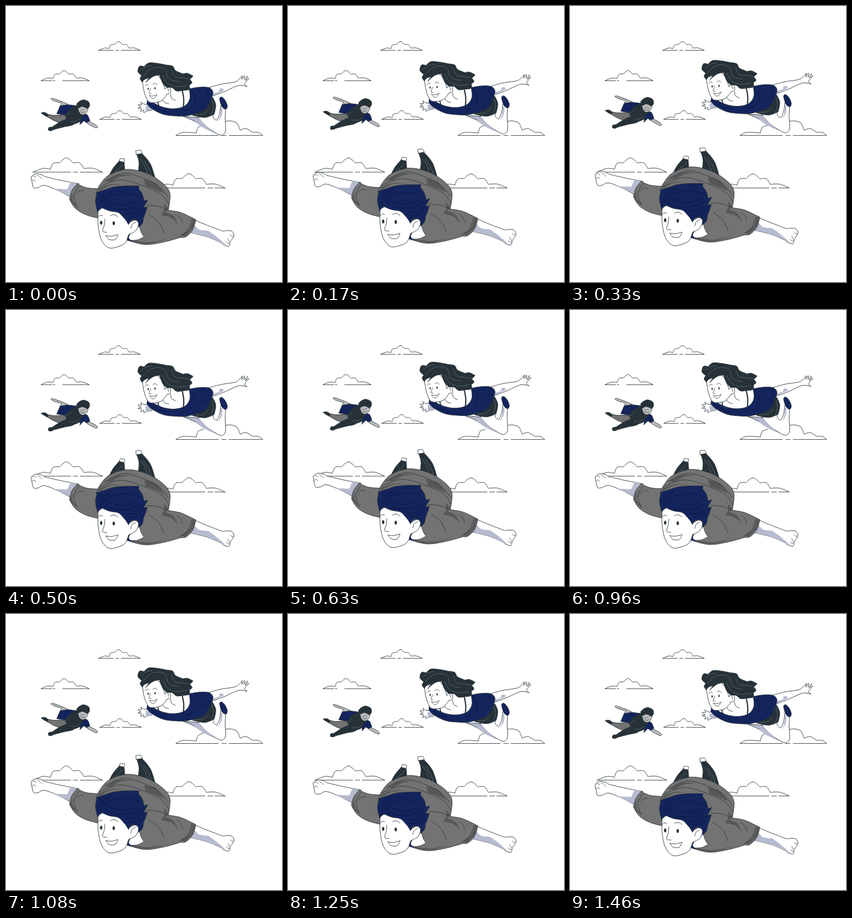
An HTML page with a canvas for the animation above (1.5 s loop, 500x500 px).

```html
<!DOCTYPE html>
<html lang="en">
<head>
<meta charset="utf-8">
<title>Flying people</title>
<style>
html, body { margin: 0; width: 100%; height: 100%; overflow: hidden; background: #fff; }
canvas { display: block; width: 500px; height: 500px; }
</style>
</head>
<body>
<canvas id="stage"></canvas>
<script>
const INK = '#263238', NAVY = '#14245c', DEEP = '#0b173f', GRAY = '#737373',
  FOLD = '#575757', SHADE = '#b7bbcf', SKIN = '#bdbdbd', HAIRLINE = '#77828a', WHITE = '#fff';
const LOOP = 1500, FPS = 24, RISE = 10;

const canvas = document.getElementById('stage');
const ctx = canvas.getContext('2d');
const ratio = window.devicePixelRatio || 1;
canvas.width = canvas.height = 500 * ratio;

// Traces a smooth curve through "x,y" points; "!" marks a sharp corner.
function trace(text, closed) {
  const points = text.split(' ').map(word => {
    const [x, y] = word.split(',').map(parseFloat);
    return { x, y, sharp: word.endsWith('!') };
  });
  const count = points.length;
  const at = i => points[(i + count) % count];
  const handle = (i, sign) => {
    const p = at(i), end = !closed && (i === 0 || i === count - 1);
    const k = p.sharp || end ? 0 : sign / 6;
    return [p.x + k * (at(i + 1).x - at(i - 1).x), p.y + k * (at(i + 1).y - at(i - 1).y)];
  };
  ctx.moveTo(at(0).x, at(0).y);
  for (let i = 1; i < count + (closed ? 1 : 0); i++) {
    ctx.bezierCurveTo(...handle(i - 1, 1), ...handle(i % count, -1), at(i).x, at(i).y);
  }
  if (closed) ctx.closePath();
}

function stroke(color = INK, width = 0.9) {
  ctx.strokeStyle = color;
  ctx.lineWidth = width;
  ctx.stroke();
}

function flat(color, text) {
  ctx.beginPath();
  trace(text, true);
  ctx.fillStyle = color;
  ctx.fill();
}

function shape(color, text, width) {
  flat(color, text);
  stroke(INK, width);
}

function lines(color, width, ...texts) {
  ctx.beginPath();
  texts.forEach(text => trace(text, false));
  stroke(color, width);
}

function eyes(rx, ry, ...centers) {
  ctx.fillStyle = INK;
  for (const [x, y] of centers) {
    ctx.beginPath();
    ctx.ellipse(x, y, rx, ry, 0, 0, 2 * Math.PI);
    ctx.fill();
  }
}

// A base line with two gaps and four puffs above it.
function cloud(x, y, width, height, gaps) {
  const puffs = '0,0 .14,-.26 .25,-.2! .29,-.62 .38,-.65! .48,-1 .58,-.63! .67,-.65 .73,-.25! .86,-.27 1,0';
  ctx.save();
  ctx.translate(x, y);
  ctx.scale(width, height);
  ctx.beginPath();
  trace(puffs, false);
  const [a, b, c, d] = gaps;
  for (const [from, to] of [[0, a], [b, c], [d, 1]]) {
    ctx.moveTo(from, 0);
    ctx.lineTo(to, 0);
  }
  ctx.restore();
  stroke();
}

function clouds() {
  cloud(168, 80.3, 75, 16, [.35, .41, .48, .54]);
  cloud(63.5, 135.3, 87, 18.5, [.22, .25, .29, .45]);
  cloud(170, 205.3, 75, 16, [.35, .41, .48, .54]);
  cloud(49, 301, 126, 26, [.54, .58, .64, .68]);
  cloud(271, 329.7, 126, 26, [.71, .75, .82, .85]);
  lines(INK, 0.9, '308,234.5 320,229 345,230! 348,220 358,216',
    '396,210 405,208 418,212 424,225! 435,222 447,229! 457,229 465,234.5',
    '308,234.5 385,234.5', '391,234.5 399,234.5', '404,234.5 465,234.5');
}

function boy() {
  shape(SKIN, '112,178! 101,173 90,169 84,167! 81,168! 87,172 101,176! 98,181! 107,184!');
  shape(NAVY, '92,195! 98,181! 112,179 129,181! 126,192! 109,197');
  shape(GRAY, '72,195! 86,198 106,198 118,205! 110,214! 90,209 72,199!');
  shape(INK, '64,194 71,193 76,197 74,200');
  shape(INK, '84,219! 98,210 114,204 126,206 122,215 105,219 86,224!');
  shape(INK, '77,225 78,220 86,220 87,223 82,226');
  shape(INK, '107,198! 115,188 127,181! 138,188 145,199! 135,209 123,214! 113,209');
  lines('#607078', 0.7, '109,199 116,193', '116,209 126,209 133,205');
  shape(SKIN, '144,206! 162,215 166,220! 163,221! 153,216 142,209!');
  shape(NAVY, '134,215! 136,205 143,196! 148,198 152,208! 147,211! 141,208! 137,212!');
  shape(SKIN, '131,181 133,193 139,197 146,193 148,182', 0.7);
  shape(INK, '131,185! 128,178 134,172! 141,170 150,174 151,182 147,186! 142,183 137,182!');
  lines(INK, 0.8, '134,188 135,188', '140,187.5 142,187.5', '138,188 136,191', '136,193 140,193 143,191');
}

function girlLimbs() {
  shape(WHITE, '363,149! 388,142 413,138 421,134 428,126! 427,133! 432,126 431,133! 438,127 ' +
    '433,135! 440,131 434,138 432,142! 437,146! 421,144 396,155 369,165!');
  flat(SHADE, '366,149! 374,153 374,159! 386,155! 387,150! 392,149! 395,153! 369,165!');
  shape(SHADE, '321,200! 345,202 363,206 377,220 393,233! 370,226 355,217 338,207');
  shape(WHITE, '348,202! 364,219 386,233 395,232 398,223 397,204 398,185! 389,180! 387,195 382,207! 376,203 375,194!');
  flat(SHADE, '349,203! 362,217 379,230! 360,222 342,210!');
  flat(SHADE, '389,184! 388,198 384,210! 391,198 392,185!');
  shape(NAVY, '387,168 391,165 397,171 401,181 398,187 391,182');
  shape(INK, '338,198! 354,179 374,165! 380,179 377,196! 360,202');
  lines(HAIRLINE, 0.6, '373,170 376,183 372,197', '342,197 357,196 367,188');
  shape(WHITE, '260,178! 251,178 244,174! 246,179! 239,179 245,183! 239,185 246,186! 244,191 250,188! 250,193 256,190 265,189!');
  flat(SHADE, '253,181! 265,179! 265,189! 253,189!');
}

function girlTorso() {
  flat(WHITE, '281,154! 279,169 270,177! 287,186 308,188 323,184! 332,170 331,151!');
  lines(INK, 0.9, '298,159 300,167 307,171', '284,170 288,175 295,177');
  lines(INK, 1.8, '275,174 277,181 280,187');
  lines(INK, 2.2, '319,152 322,169 321,187');
  shape(NAVY, '257,167! 270,177 287,184 306,186 324,181 333,168 332,150! 351,147 368,148 375,156 ' +
    '372,167 366,181 355,191 327,199 304,199 284,196 264,186 255,177!');
  lines(DEEP, 0.9, '332,153 341,161 342,175 334,186 320,190', '368,149 364,157 370,166',
    '260,177 275,187 291,191', '350,177 358,171 366,170');
}

function girlHead() {
  shape(WHITE, '247,135! 250,154 255,168 262,175 279,173 288,165 291,160! 298,157 297,148 292,146 288,151! 283,135! 272,122!');
  shape(INK, '247,138! 243,132 246,126! 239,119 242,109 250,110! 259,103 275,104 291,107! ' +
    '302,109 307,117 321,123! 329,122 339,127! 333,133! 337,139 332,143! 332,151 321,153 ' +
    '309,154 301,148 292,148! 284,140 278,125! 268,127 259,133 253,139! 259,130! 251,133');
  lines(HAIRLINE, 0.6, '249,126 262,114 277,111 289,116 295,132 313,137',
    '284,126 293,140 309,146 328,144', '300,116 306,128 319,130 332,132', '245,117 254,110 265,108');
  eyes(1.2, 2.1, [257.5, 150], [270, 149]);
  lines(INK, 0.8, '252,145 255,142 258,143', '266,142 270,140 274,143', '262,149 259,158! 263,159', '292,151 294,150 295,155');
  shape(WHITE, '260,162! 267,163 274,160! 269,167 264,167', 0.8);
}

function manLegs() {
  shape(INK, '186,309! 194,294 205,281! 214,283! 216,306!');
  shape(WHITE, '205,281! 207,276! 215,277! 214,283!');
  shape(INK, '237,269! 246,267! 262,287 272,319! 239,303! 241,284');
  shape(WHITE, '236,269! 235,262! 244,261! 247,267!');
  lines(HAIRLINE, 0.7, '193,304 205,294 211,287', '243,278 252,291 257,307', '249,279 258,293 264,309');
}

function manArms() {
  shape(WHITE, '132,322! 100,316 70,309! 63,305 54,304 46,309 47,318 50,329 58,329 70,325 94,334 117,346!');
  lines(INK, 0.7, '48,309 52,308 54,311', '47,317 51,315 54,318', '56,306 61,309 65,313');
  flat(SHADE, '130,322! 117,345! 87,331! 111,332! 117,319!');
  shape(WHITE, '338,386! 364,397 393,408! 400,407 409,408 413,416 406,427! 404,435 395,433 390,429! 364,418 335,411!');
  flat(SHADE, '342,397! 350,405 366,407! 380,417 399,433! 364,418 335,411!');
  lines(INK, 0.7, '412,417 409,417 406,414', '406,427 403,425 402,421', '399,427 402,430 405,430');
}

function manShirt() {
  shape(GRAY, '129,322! 145,329 166,331! 184,308 218,296 255,303 284,321 297,340 294,370! ' +
    '316,374 336,383 344,387! 338,406 326,418 317,419! 284,428 250,432 213,422! ' +
    '176,386! 147,379 126,367 115,350! 119,335');
  flat(FOLD, '180,318! 203,306 229,307! 208,309 191,318!');
  flat(FOLD, '250,315! 271,321 287,340! 271,333 253,326!');
  flat(FOLD, '167,331! 190,323 217,324! 189,325 169,336!');
  flat(FOLD, '285,357! 294,367 288,373! 303,380 312,396! 300,384 281,379! 287,368');
  flat(FOLD, '338,386! 332,404 316,415! 324,418! 339,402 344,387!');
  flat(FOLD, '121,337! 121,353 132,363! 121,359 116,351!');
  flat(FOLD, '222,423! 258,428 294,421! 258,431 222,425!');
  lines(INK, 0.8, '166,331 163,348 165,367', '169,328 207,315 252,327 283,343 295,360',
    '178,318 213,303 251,313 278,328 294,347', '294,370 276,363 255,361',
    '132,326 123,344 129,365', '337,386 329,406 314,418', '259,378 277,392 286,411');
  lines(INK, 0.7, '127,340 133,335 141,335', '310,379 317,385 320,394');
}

function manHead() {
  shape(WHITE, '220,424! 228,408 241,397! 245,410 250,418! 237,424');
  flat(NAVY, '219,416! 221,424 229,426! 223,421 222,414!');
  shape(WHITE, '167,370! 167,398 173,424 186,438 203,436 216,429 222,414! 235,407 240,394 233,388 222,394! 216,363! 190,358!');
  shape(NAVY, '166,373! 162,354 165,341! 163,338! 179,333! 195,328 215,326 241,326! ' +
    '240,331! 247,341 250,353! 257,351! 249,365! 256,364! 253,374 249,384! 247,394 240,401! ' +
    '240,391 234,387 226,389 222,396! 217,388 211,381! 203,374 187,371 173,365!');
  lines(DEEP, 0.9, '170,356 178,343 190,336', '171,362 182,347 198,342 222,340 242,346',
    '181,364 181,351 171,341', '190,367 220,368 244,358', '186,354 211,361 238,354',
    '216,376 234,375 249,365', '222,383 235,381 244,374');
  eyes(2.1, 3.5, [172.4, 392.5], [195.2, 393.5]);
  lines(INK, 0.9, '167,382 171,379 175,380', '189,380 196,378 203,382',
    '179,386 178,397 175,408 183,410', '226,403 229,395 235,392');
  shape(WHITE, '181,416! 191,417 203,414! 198,423 187,423');
}

// Time advances in 24 fps steps; the figures rise and sink linearly.
function draw(ms) {
  const step = Math.floor(((ms + 4) % LOOP) * FPS / 1000);
  const phase = step / (LOOP * FPS / 1000);
  const lift = RISE * (1 - Math.abs(2 * phase - 1));
  ctx.setTransform(ratio, 0, 0, ratio, 0, 0);
  ctx.lineCap = ctx.lineJoin = 'round';
  ctx.fillStyle = WHITE;
  ctx.fillRect(0, 0, 500, 500);
  clouds();
  ctx.translate(0, -lift);
  for (const figure of [boy, girlLimbs, girlTorso, girlHead, manLegs, manArms, manShirt, manHead]) figure();
}

const start = performance.now();
function tick() {
  draw(performance.now() - start);
  requestAnimationFrame(tick);
}
tick();
</script>
</body>
</html>
```
